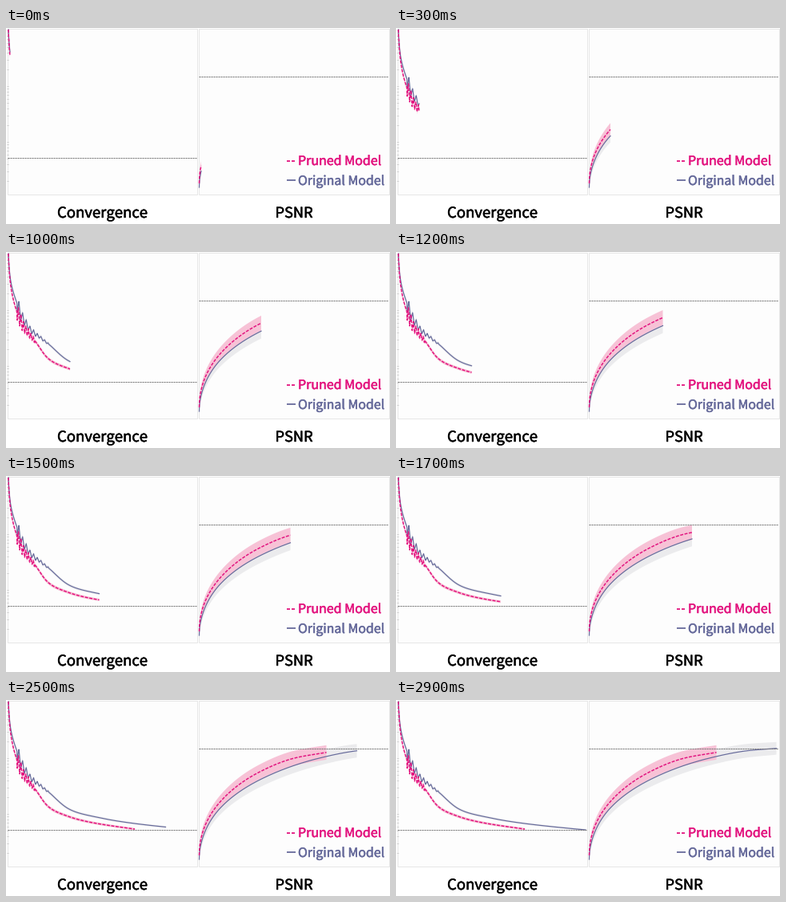
Write a matplotlib script that moves like this. It is 480 px wide and 246 px high and loops after 3 s.

```python
import numpy as np
import matplotlib.pyplot as plt
from matplotlib.animation import FuncAnimation
from matplotlib.patches import Polygon, Rectangle
from matplotlib.patheffects import Normal, Stroke

W, H = 480, 246
FRAMES, INTERVAL = 30, 100
PX = 0.72  # points per pixel at 100 dpi
PINK, BLUE = "#e3147f", "#666a9b"
PINK_BAND, GREY_BAND = "#f7c2d6", "#ebebed"
FONT = "Noto Sans CJK JP"
SHIFT = 239  # offset between the two panels

rng = np.random.default_rng(4)


def curve(points, warp, step=0.25):
    """Hermite curve through key points, with x warped to even out the bend."""
    px, py = np.array(points, float).T
    x = np.arange(px[0], px[-1] + step / 2, step)
    u, pu = warp(x), warp(px)
    slope = np.gradient(py, pu)
    i = np.clip(np.searchsorted(pu, u, side="right") - 1, 0, len(pu) - 2)
    h = pu[i + 1] - pu[i]
    t = (u - pu[i]) / h
    y = ((2 * t**3 - 3 * t**2 + 1) * py[i] + (t**3 - 2 * t**2 + t) * h * slope[i]
         + (3 * t**2 - 2 * t**3) * py[i + 1] + (t**3 - t**2) * h * slope[i + 1])
    return x, y


def zigzag(x, start, end, step, amp):
    """Fading up and down spikes of uneven height."""
    nodes = np.arange(start, end, step)
    sign = (-1.0) ** np.arange(len(nodes))
    size = amp * np.exp((start - nodes) / 17) * rng.uniform(0.6, 1, len(nodes))
    return np.interp(x, nodes, sign * size, left=0, right=0)


def loss(points, **spikes):
    x, y = curve(points, lambda x: np.log(x - 2))
    return x, y + zigzag(x, **spikes), 1 + 2 * np.exp(-x / 90)


def psnr(points):
    x, y = curve(points, np.sqrt)
    return x + SHIFT + 2.5, y, 9.4 - 0.054 * (np.sqrt(x) - 10) ** 2


fig = plt.figure(figsize=(W / 100, H / 100), dpi=100, facecolor="white")
ax = fig.add_axes([0, 0, 1, 1])
ax.set_xlim(0, W)
ax.set_ylim(H, 0)
ax.axis("off")

# panels, log-scale ticks and reference lines
for x, w in ((1.5, 237), (240.5, 238)):
    ax.add_patch(Rectangle((x, 0.5), w, 208, fc="#fdfdfd", ec="#e6e6e6",
                           lw=PX, zorder=0))
for top in (3, 73, 143):
    for k in range(2, 11):
        y = top - 70 * np.log10(k / 10)
        ax.plot([0.5, 2.5], [y, y], color="#b5b5b5", lw=0.5 * PX, zorder=1)
for x0, x1, y in ((2, 238, 162.5), (241, 478, 60.5)):
    ax.plot([x0, x1], [y, y], color="#777777", lw=PX, zorder=4,
            dashes=(2.1, 0.9), dash_capstyle="butt")


def label(x, y, text, size, color):
    bold = [Stroke(linewidth=0.5 * PX, foreground=color), Normal()]
    ax.text(x, y, text, family=FONT, size=size * PX, color=color,
            ha="left", va="baseline", zorder=6, path_effects=bold)


label(64, 238, "Convergence", 18.5, "black")
label(336.5, 238, "PSNR", 18.2, "black")
label(365, 172, "Pruned Model", 16, PINK)
label(365, 197, "Original Model", 15.9, BLUE)
for x0, x1, y, c in ((351, 355, 166.5, PINK), (357, 361, 166.5, PINK),
                     (351, 362, 190.5, BLUE)):
    ax.plot([x0, x1], [y, y], color=c, lw=1.8 * PX, zorder=6,
            solid_capstyle="butt")


class Trace:
    """Curve with a band, revealed from the left up to a given x."""

    def __init__(self, data, color, band, z, dashed=False):
        self.x, self.y, self.half = data
        self.band = Polygon([(0, 0), (0, 0)], fc=band, ec="none", zorder=z)
        ax.add_patch(self.band)
        self.line, = ax.plot([], [], color=color, zorder=z + 2,
                             lw=(1.5 if dashed else 1.2) * PX)
        if dashed:
            self.line.set_dashes((2.6, 1.1))
            self.line.set_dash_capstyle("butt")

    def reveal(self, front):
        n = np.searchsorted(self.x, front, side="right")
        x, y, h = self.x[:n], self.y[:n], self.half[:n]
        self.line.set_data(x, y)
        self.band.set_xy(np.column_stack([np.append(x, x[::-1]),
                                          np.append(y - h, (y + h)[::-1])]))
        return [self.band, self.line]


loss_full = loss([(3, 2), (5, 30), (14, 65), (29, 95), (55, 117), (79, 137),
                  (118, 148), (237, 163)], start=13.8, end=54, step=2.3, amp=13)
loss_pruned = loss([(3, 2), (5, 35), (12, 70), (24, 97), (38, 114), (52, 133),
                    (79, 146.5), (161, 162)], start=14, end=36, step=1.55, amp=14)
psnr_full = psnr([(0, 200), (26, 136), (76, 100), (150, 73), (195, 64),
                  (234, 60.7)])
psnr_pruned = psnr([(0, 195), (6, 161), (26, 128), (76, 90), (115, 74),
                    (159, 65.8)])

traces = [
    (Trace(loss_full, BLUE, GREY_BAND, 1), 0),
    (Trace(loss_pruned, PINK, PINK_BAND, 1.5, dashed=True), 0),
    (Trace(psnr_full, BLUE, GREY_BAND, 1), SHIFT),
    (Trace(psnr_pruned, PINK, PINK_BAND, 1.5, dashed=True), SHIFT),
]


def draw(i):
    front = np.interp(i, [0, 3, 20, 29], [5, 29, 153, 237])
    return [a for trace, shift in traces for a in trace.reveal(front + shift)]


anim = FuncAnimation(fig, draw, frames=FRAMES, interval=INTERVAL,
                     repeat=True, repeat_delay=0, blit=False)
plt.show()
```
